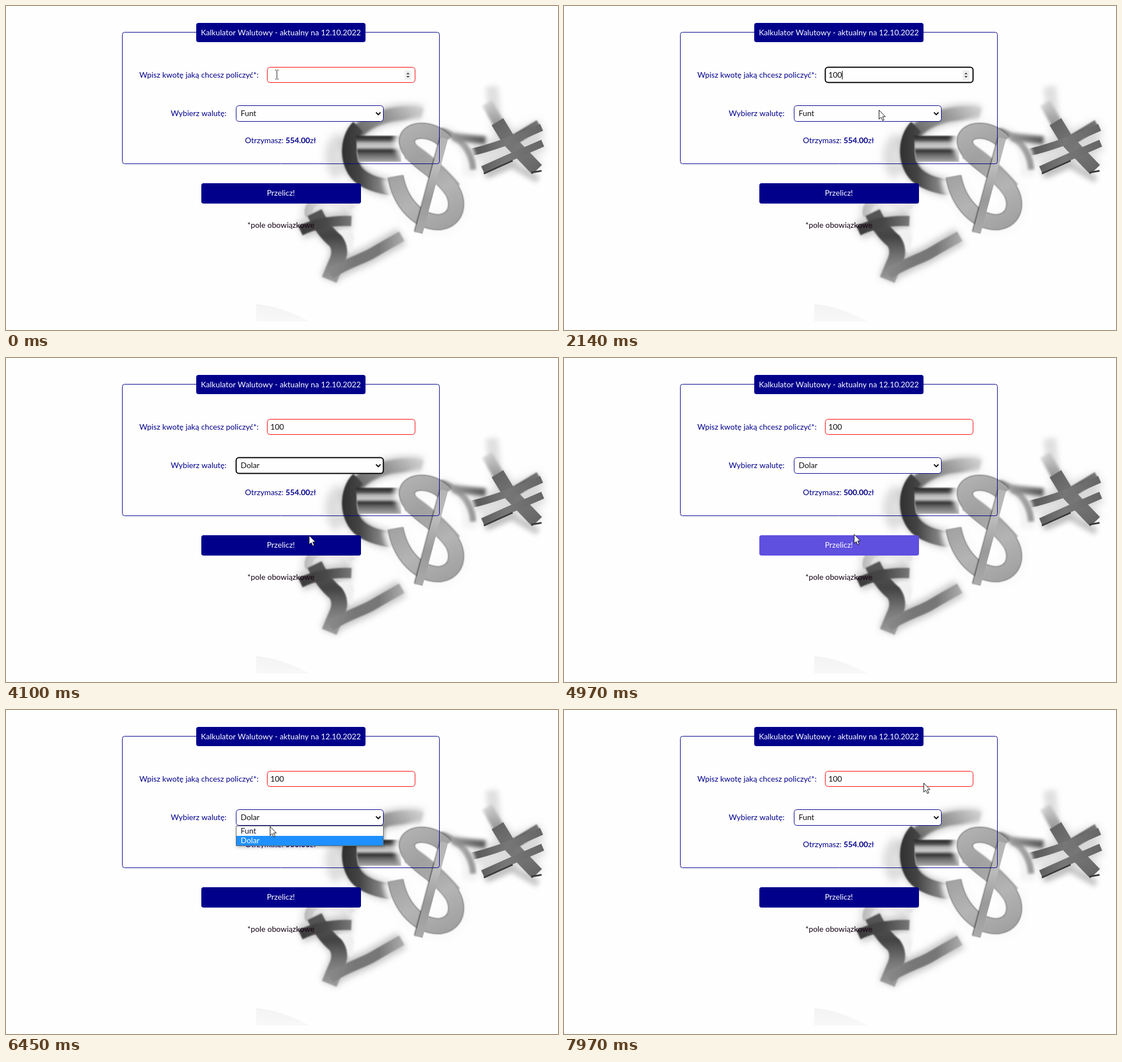
Recreate the animation shown at these times as an HTML page with a canvas. Size 975x574 px, loop 8 s.

```html
<!DOCTYPE html>
<html lang="pl">
<head>
<meta charset="utf-8">
<title>Kalkulator</title>
<style>
html, body { margin: 0; width: 100%; height: 100%; overflow: hidden; background: #fefefe; }
canvas { display: block; }
</style>
</head>
<body>
<canvas id="stage" width="975" height="574"></canvas>
<script>
const LOOP = 8000;
const NAVY = '#00008b';
const canvas = document.getElementById('stage');
const backdrop = document.createElement('canvas');
backdrop.width = canvas.width;
backdrop.height = canvas.height;
let ctx = backdrop.getContext('2d');

function ramp(x0, y0, x1, y1, ...colors) {
  const g = ctx.createLinearGradient(x0, y0, x1, y1);
  colors.forEach((c, i) => g.addColorStop(i / (colors.length - 1), c));
  return g;
}

function stroke(path, width, color, blur = 0) {
  ctx.filter = blur ? `blur(${blur}px)` : 'none';
  ctx.lineWidth = width;
  ctx.strokeStyle = color;
  ctx.stroke(new Path2D(path));
  ctx.filter = 'none';
}

function fill(path, color, blur = 0) {
  ctx.filter = blur ? `blur(${blur}px)` : 'none';
  ctx.fillStyle = color;
  ctx.fill(new Path2D(path));
  ctx.filter = 'none';
}

function paintEuro() {
  const ring = 'M734 193 C675 181 609 210 607 257 C607 290 630 314 680 322';
  stroke('M592 232 Q560 262 590 300', 24, 'rgba(120,120,120,.25)', 7);
  stroke(ring, 34, 'rgba(90,90,90,.28)', 6);
  stroke(ring, 24, ramp(600, 310, 735, 190, '#383838', '#444', '#777', '#999', '#ccc'), 2);
  stroke('M622 214 C600 235 602 280 622 300 C635 312 655 319 682 321', 25,
    ramp(594, 0, 685, 0, '#303030', '#444', '#777', '#aaa'), 1);
  fill('M618 230 H698 V276 H622 Z', ramp(0, 230, 0, 276,
    '#282828', '#484848', '#b5b5b5', '#ccc', '#333', '#666', '#888', '#aaa'), 1);
}

function paintYen() {
  const bars = 'M818 260 Q870 249 946 215 M842 290 Q890 268 948 243';
  const stem = 'M868 205 L888 238 L938 290';
  stroke('M858 142 L864 200', 22, 'rgba(120,120,120,.22)', 5);
  stroke(stem + bars, 28, 'rgba(110,110,110,.25)', 7);
  stroke('M848 300 L893 281 L940 308', 12, 'rgba(150,150,150,.5)', 4);
  stroke('M850 172 L886 236', 20, ramp(0, 165, 0, 230, 'rgba(150,150,150,.2)', '#666'), 2);
  stroke('M942 210 L886 244', 18, ramp(885, 0, 945, 0, '#555', '#777'), 1);
  stroke(stem, 24, ramp(870, 210, 940, 290, '#666', '#777', '#666'), .7);
  stroke(bars, 13, ramp(820, 0, 948, 0, '#555', '#777', '#666'), .7);
  stroke('M844 297 L895 274 M928 295 L946 292', 3, '#3a3a3a', .7);
}

function paintPound() {
  const hook = 'M536 372 C529 351 551 339 582 343 Q602 347 610 360';
  const stem = 'M545 366 Q560 398 582 416 Q594 432 584 454 Q578 468 571 485';
  const foot = 'M573 474 C604 455 622 451 645 439 Q674 422 699 408';
  const cross = 'M520 398 Q560 379 610 381';
  stroke(hook, 28, 'rgba(130,130,130,.2)', 6);
  stroke(stem + foot + cross, 32, 'rgba(80,80,80,.3)', 6);
  fill('M575 402 Q615 385 615 412 L610 438 Q595 430 585 412 Z', '#f0f0f0', 2);
  stroke(hook, 15, ramp(530, 0, 612, 0, '#bbb', '#f0f0f0', '#e4e4e4'), 1);
  stroke(stem, 28, ramp(0, 370, 0, 485, '#555', '#444', '#777', '#999'), .8);
  stroke(foot, 19, ramp(575, 0, 700, 0, '#888', '#777', '#777', '#aaa'), .8);
  stroke(cross, 18, ramp(520, 0, 610, 0, '#3c3c3c', '#484848', '#777'), .8);
}

function paintDollar() {
  const curve = 'M688 302 C696 348 728 384 766 383 C798 379 804 345 782 318 ' +
    'C760 289 712 270 708 241 C707 216 752 213 776 240';
  const bar = 'M774 234 L729 402';
  stroke(curve, 46, 'rgba(250,250,250,.9)', 4);
  stroke('M772 225 C806 228 824 262 818 302', 24, '#f3f3f3', 3);
  stroke('M768 221 C798 229 823 253 825 290', 11, ramp(770, 0, 826, 0, '#777', '#aaa', '#999'), 2);
  stroke('M790 232 L847 238', 14, ramp(790, 0, 847, 0, '#999', '#555'), 3);
  stroke(curve, 28, '#777', 1);
  stroke('M712 256 Q755 284 790 326', 31, '#a4a4a4', 1);
  stroke(curve, 25, ramp(690, 215, 790, 390, '#b4b4b4', '#a0a0a0', '#b4b4b4', '#a0a0a0'));
  stroke('M768 234 L723 400', 5, 'rgba(50,50,50,.7)', 1);
  stroke(bar, 14, ramp(0, 230, 0, 400, '#b4b4b4', '#bbb', '#999', '#aaa'));
}

function paintBackdrop() {
  fill('M0 0 H975 V574 H0 Z', '#fefefe');
  fill('M442 528 Q490 533 536 559 H442 Z', ramp(0, 528, 0, 559, '#f3f3f3', '#f8f8f8'));
  paintEuro();
  paintYen();
  paintPound();
  paintDollar();
}

function box(x, y, w, h, r, { bg, border, line = 1 }) {
  ctx.beginPath();
  ctx.roundRect(x, y, w, h, r);
  if (bg) { ctx.fillStyle = bg; ctx.fill(); }
  if (border) { ctx.strokeStyle = border; ctx.lineWidth = line; ctx.stroke(); }
}

function text(str, x, y, color, { align = 'left', weight = 400 } = {}) {
  ctx.font = `${weight} 13.8px Lato, sans-serif`;
  ctx.textAlign = align;
  ctx.fillStyle = color;
  ctx.fillText(str, x, y);
}

// time, x, y of the pointer tip
const pointerPath = [
  [0, 478, 121], [70, 478, 121], [200, 483, 28], [270, 482, 34], [1470, 482, 34],
  [1810, 557, 174], [2010, 557, 174], [2140, 556, 184], [2540, 556, 184],
  [3030, 569, 219], [3240, 560, 229], [3520, 560, 229], [4100, 535, 314],
  [4300, 522, 328], [4900, 522, 328], [4970, 512, 312], [5030, 510, 305],
  [5220, 510, 305], [5980, 470, 192], [6330, 470, 192], [6450, 466, 206],
  [6520, 466, 212], [6730, 466, 212], [7490, 520, 328], [7560, 520, 328], [7970, 635, 129]
];

const between = (t, a, b) => t >= a && t < b;
const clamp = v => Math.min(1, Math.max(0, v));
const smooth = v => v * v * (3 - 2 * v);
const progress = (t, a, b) => smooth(clamp((t - a) / (b - a)));

function pointerAt(t) {
  const i = pointerPath.findIndex(k => k[0] > t);
  if (i < 0) return pointerPath[pointerPath.length - 1].slice(1);
  const [t0, x0, y0] = pointerPath[i - 1], [t1, x1, y1] = pointerPath[i];
  const p = progress(t, t0, t1);
  return [Math.round(x0 + (x1 - x0) * p), Math.round(y0 + (y1 - y0) * p)];
}

function stateAt(t) {
  const firstOpen = between(t, 2540, 3520), secondOpen = between(t, 6110, 6730);
  return {
    amount: '100'.slice(0, t < 470 ? 0 : t < 800 ? 1 : t < 940 ? 2 : 3),
    typing: between(t, 70, 2540),
    spinner: t < 2540,
    caret: between(t, 70, 1440) || between(t, 2010, 2500),
    currency: between(t, 3520, 6730) ? 'Dolar' : 'Funt',
    open: firstOpen || secondOpen,
    active: firstOpen ? +(t >= 3100) : +(t < 6500),
    selectFocus: between(t, 3520, 4570) || between(t, 6730, 7560),
    result: between(t, 4570, 7560) ? '500.00' : '554.00',
    hover: progress(t, 4100, 4300) - progress(t, 4970, 5300) +
      progress(t, 7300, 7490) - progress(t, 7640, 7850)
  };
}

function drawField(x, y, w, h, color, focused) {
  box(x + .5, y + .5, w, h, 5, { bg: '#fefefe', border: focused ? '#000' : color, line: focused ? 2 : 1 });
}

function drawInput(s) {
  drawField(461, 108, 261, 27, '#f00', s.typing);
  text(s.amount, 467, 127, '#111');
  if (s.caret) {
    ctx.fillStyle = '#000';
    ctx.fillRect(Math.round(467 + ctx.measureText(s.amount).width), 115, 1, 15);
  }
  if (s.spinner) {
    box(704, 114, 12, 17, 0, { bg: '#efefef' });
    fill('M707 121 L710 118 L713 121 Z M707 124 L710 127 L713 124 Z', '#444');
  }
}

function drawSelect(s) {
  drawField(406, 176, 260, 28, NAVY, s.selectFocus);
  text(s.currency, 414.5, 195, '#111');
  stroke('M653.5 188.5 L657.5 192.5 L661.5 188.5', 2, '#111');
}

function drawMenu(active) {
  ctx.shadowColor = 'rgba(0,0,0,.3)';
  ctx.shadowBlur = 6;
  ctx.shadowOffsetX = ctx.shadowOffsetY = 2;
  box(406, 205, 261, 36, 0, { bg: '#fff' });
  ctx.shadowColor = 'transparent';
  ctx.shadowBlur = ctx.shadowOffsetX = ctx.shadowOffsetY = 0;
  box(406.5, 205.5, 260, 35, 0, { border: '#666' });
  ['Funt', 'Dolar'].forEach((name, i) => {
    const on = i === active;
    if (on) box(407, 206 + 17 * i, 259, 17, 0, { bg: '#1e90ff' });
    text(name, 414.5, 219 + 17 * i, on ? '#fff' : '#151530');
  });
}

function drawPointer(t) {
  const [x, y] = pointerAt(t);
  ctx.save();
  ctx.translate(x + .5, y + .5);
  if (t < 100) {
    stroke('M-3 -8 H-1 L0 -7 L1 -8 H3 M0 -7 V7 M-3 8 H-1 L0 7 L1 8 H3', 1, '#222');
  } else {
    const arrow = 'M0 0 V16 L3.6 12.6 L6.3 18.4 L8.8 17.3 L6.2 11.5 H11 Z';
    fill(arrow, '#fff');
    stroke(arrow, 1, '#111');
  }
  ctx.restore();
}

function draw(t) {
  const s = stateAt(t);
  const mix = (a, b) => Math.round(a + (b - a) * s.hover);
  ctx.drawImage(backdrop, 0, 0);

  box(205.5, 46.5, 560, 233, 4, { border: NAVY });
  box(336, 30, 299, 34, 4, { bg: NAVY });
  text('Kalkulator Walutowy - aktualny na 12.10.2022', 485.5, 52, '#fff', { align: 'center' });

  text('Wpisz kwotę jaką chcesz policzyć*:', 235.5, 127, NAVY);
  drawInput(s);
  text('Wybierz walutę:', 291, 195, NAVY);
  drawSelect(s);

  text('Otrzymasz: ', 422, 243, NAVY);
  const x = 422 + ctx.measureText('Otrzymasz: ').width;
  text(s.result, x, 243, NAVY, { weight: 700 });
  text('zł', x + ctx.measureText(s.result).width, 243, NAVY);

  box(345, 314, 282, 36, 4, { bg: `rgb(${mix(0, 95)},${mix(0, 80)},${mix(139, 223)})` });
  text('Przelicz!', 485.5, 336, '#fff', { align: 'center' });
  text('*pole obowiązkowe', 485.5, 393, '#140010', { align: 'center' });

  if (s.open) drawMenu(s.active);
  drawPointer(t);
}

paintBackdrop();
ctx = canvas.getContext('2d');
const start = performance.now();
function frame() {
  draw((performance.now() - start) % LOOP);
  requestAnimationFrame(frame);
}
frame();
</script>
</body>
</html>
```
